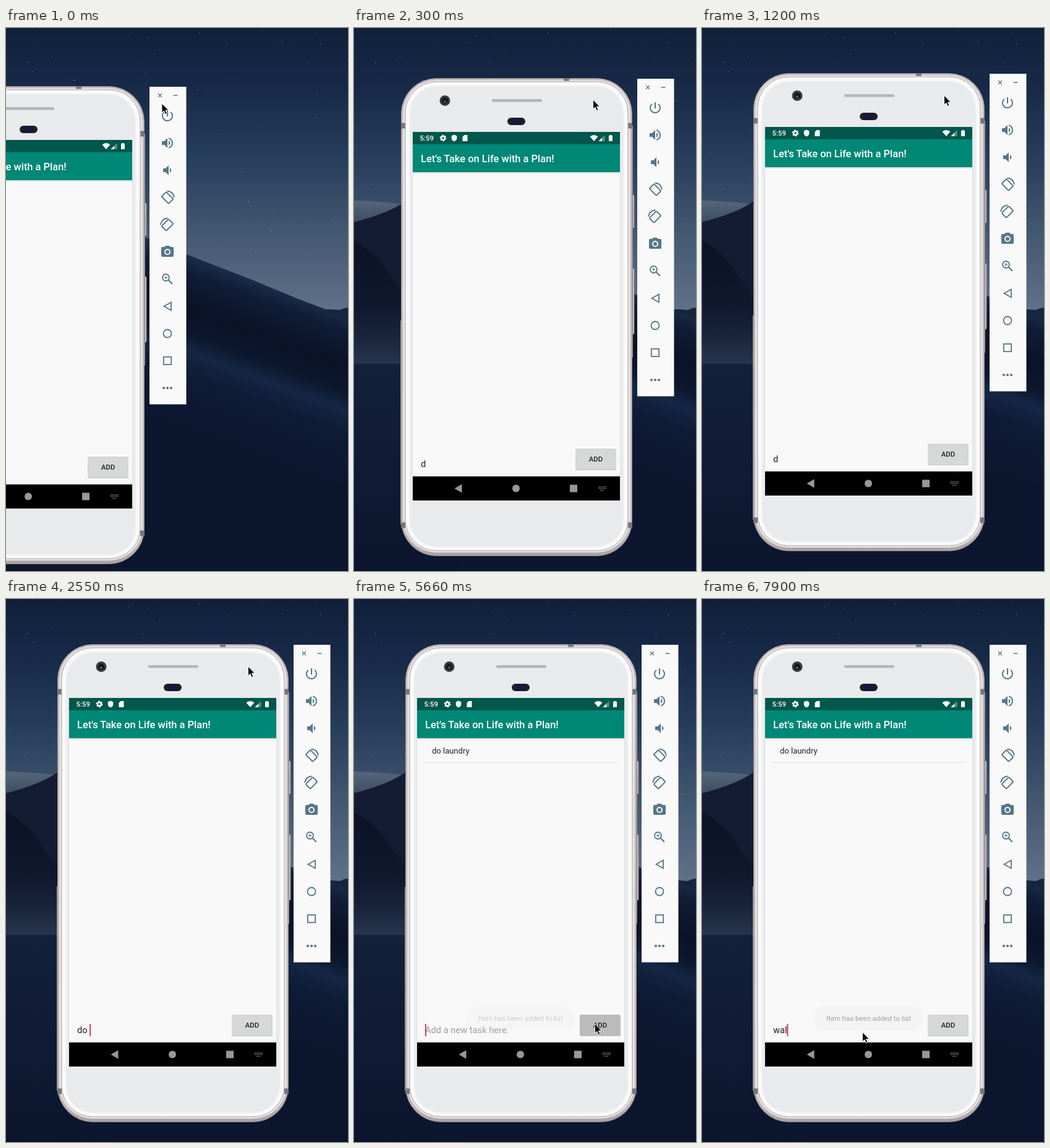
Recreate the animation shown at these times as an HTML page. Size 553 by 878 pixels, loop 8000 ms.

```html
<!DOCTYPE html>
<html>
<head>
<meta charset="utf-8">
<style>
  html, body { margin: 0; height: 100%; overflow: hidden; background: #0b1530; }
  svg { display: block; width: 553px; height: 878px; }
  text { font-family: Roboto, sans-serif; white-space: pre; fill: #222; }
  .medium { font-weight: 500; }
  .line { fill: none; stroke: #557788; stroke-width: 1.8; }
</style>
</head>
<body>
<svg viewBox="0 0 553 878">
  <defs>
    <linearGradient id="sky" gradientUnits="userSpaceOnUse" x1="0" y1="0" x2="0" y2="460">
      <stop offset="0" stop-color="#10203a"/><stop offset=".2" stop-color="#162a47"/>
      <stop offset=".45" stop-color="#263d5b"/><stop offset=".7" stop-color="#41566f"/>
      <stop offset="1" stop-color="#5f738a"/>
    </linearGradient>
    <linearGradient id="ridge" x1="0" y1="0" x2="0" y2="1">
      <stop offset="0" stop-color="#56667b"/><stop offset="1" stop-color="#2a394f"/>
    </linearGradient>
    <linearGradient id="hollow" x1="0" y1="0" x2="0" y2="1">
      <stop offset="0" stop-color="#0b1226"/><stop offset=".55" stop-color="#10192f"/>
      <stop offset=".8" stop-color="#1a263d"/><stop offset="1" stop-color="#27364e"/>
    </linearGradient>
    <linearGradient id="ground" x1="0" y1="0" x2="0" y2="1">
      <stop offset="0" stop-color="#14213b"/><stop offset="1" stop-color="#0b152e"/>
    </linearGradient>
    <linearGradient id="dune" gradientUnits="userSpaceOnUse" x1="400" y1="405" x2="305" y2="660">
      <stop offset="0" stop-color="#1b2f4b"/><stop offset=".1" stop-color="#101d36"/>
      <stop offset=".3" stop-color="#0a1227"/><stop offset=".45" stop-color="#0c182f"/>
      <stop offset=".54" stop-color="#142744"/><stop offset=".68" stop-color="#0e1b35"/>
      <stop offset="1" stop-color="#0c162f"/>
    </linearGradient>
    <linearGradient id="metal" x1="0" y1="0" x2="0" y2="1">
      <stop offset="0" stop-color="#d3cbcc"/><stop offset=".93" stop-color="#d3cbcc"/>
      <stop offset="1" stop-color="#a9a2a3"/>
    </linearGradient>
    <filter id="soft"><feGaussianBlur stdDeviation="1.2"/></filter>
  </defs>

  <rect width="553" height="878" fill="url(#sky)"/>
  <g id="stars" fill="#a9bccd"></g>
  <path d="M170 318Q225 337 292 366L400 408 470 437 520 456 553 466V878H170Z" fill="url(#dune)"/>
  <path d="M514 455l12 0 14 1 7-3 6-1v18z" fill="#17253c"/>
  <path d="M0 279Q45 280 90 286V340H0Z" fill="url(#ridge)"/>
  <path d="M90 275Q70 291 42 301 20 309 0 314V543H90Z" fill="#131c32"/>
  <path d="M0 345Q35 363 52 390 68 418 90 436V543H0Z" fill="url(#hollow)"/>
  <rect y="543" width="170" height="335" fill="url(#ground)"/>
  <rect y="877" width="553" height="1" fill="#050a14"/>

  <g id="emulator">
    <!-- phone body -->
    <g fill="#c5c0c1" stroke="#8d898b" stroke-width=".7">
      <rect x="454" y="262" width="6" height="53" rx="1.5"/>
      <rect x="454" y="381" width="6" height="106" rx="1.5"/>
    </g>
    <path d="M458.700 277V312" stroke="#858184" stroke-dasharray="1 2"/>
    <path d="M82.500 465V795M457.500 150V525" stroke="#9b9596"/>
    <rect x="83.500" y="73.500" width="373" height="772" rx="57" fill="url(#metal)" stroke="#928c8e"/>
    <rect x="85.500" y="75.500" width="369" height="765" rx="55" fill="#e8e1e2" stroke="#b8afb0"/>
    <path d="M83 150h7M450 150h7M83 796h7M450 796h7" stroke="#777679" stroke-width="9"/>
    <path d="M346 75.500h9" stroke="#77777a" stroke-width="4"/>
    <rect x="90" y="79" width="360" height="758" rx="50" fill="#fafafa" stroke="#aaa6a8"/>
    <rect x="97" y="86" width="346" height="745" rx="44" fill="#e8eaeb" filter="url(#soft)"/>
    <circle cx="154" cy="109.500" r="8.500" fill="#3a3a3d"/>
    <circle cx="154" cy="109.500" r="5" fill="#17181d"/>
    <circle cx="154" cy="111" r="1.600" fill="#77787d"/>
    <rect x="230" y="107" width="81" height="4.500" rx="2" fill="#b3b5bf"/>
    <rect x="255" y="137" width="29" height="12" rx="6" fill="#202024"/>
    <rect x="261" y="138" width="17" height="10" rx="3" fill="#15183a"/>

    <!-- screen -->
    <rect x="101.500" y="160" width="336" height="596" fill="#d5d7d8"/>
    <rect x="102" y="160" width="335" height="596" fill="#f8f8f8"/>
    <rect x="102" y="225" width="335" height="2" fill="#d9dedd"/>
    <rect x="102" y="160" width="335" height="20" fill="#00574b"/>
    <rect x="102" y="180" width="335" height="45" fill="#008775"/>
    <g fill="#fff">
      <text class="medium" x="113.500" y="174" font-size="11.400" style="fill:#fff">5:59</text>
      <circle cx="151" cy="170" r="3" fill="none" stroke="#fff" stroke-width="2.600"/>
      <circle cx="151" cy="170" r="4.700" fill="none" stroke="#fff" stroke-width="1.400" stroke-dasharray="2.460"/>
      <path d="M169 164.500l4.300 2v3.500q0 4-4.300 5.500-4.300-1.500-4.300-5.500v-3.500z"/>
      <path d="M185.500 165h5v10h-8v-7z"/>
      <path d="M388.500 167.500q6.500-5 13 0L395 175z"/>
      <path d="M412.500 165v10h-10z" opacity=".35"/><path d="M408 169.500v5.500h-5.500z"/>
      <path d="M420.500 165h3v1h1.500v9h-6v-9h1.500z"/>
    </g>
    <text class="medium" x="115" y="209" font-size="16.450" style="fill:#fff">Let's Take on Life with a Plan!</text>

    <g id="item">
      <text x="126" y="250" font-size="13">do laundry</text>
      <path d="M114 264.500H425" stroke="#dcdcdc"/>
    </g>
    <text id="input" x="115" y="702.300" font-size="14.670"></text>
    <rect id="caret" y="687" width="1.700" height="20" fill="#d81b60"/>
    <rect x="365" y="673" width="66" height="34" rx="2" fill="#c6c6c6"/>
    <rect id="button" x="365" y="672" width="66" height="34" rx="2"/>
    <text class="medium" x="398" y="693" font-size="11.400" text-anchor="middle">ADD</text>
    <g id="toast">
      <rect x="180.500" y="658" width="177.500" height="39" rx="19.500" fill="#eeeeee"/>
      <text x="269.500" y="682" font-size="11.400" text-anchor="middle">Item has been added to list</text>
    </g>

    <rect x="102" y="717" width="335" height="39" fill="#000"/>
    <g fill="#989898">
      <path d="M181.500 729.500v14l-12-7z"/>
      <circle cx="269" cy="736.500" r="6"/>
      <rect x="356" y="730.500" width="12" height="12"/>
    </g>
    <path d="M402 734h13M402 736.500h13M405 739.500h7" stroke="#8a8a8a" stroke-width="1.300" stroke-dasharray="1.300 1"/>

    <!-- tool panel -->
    <rect x="465" y="74" width="59.500" height="513.500" fill="#f9f9f9"/>
    <path class="line" style="stroke-width:1.400" d="M479 85l6 6m0-6l-6 6M503.500 88h7"/>
    <g id="icons" fill="#557788" fill-rule="evenodd"></g>
    <g class="line">
      <path d="M500 422.500v13l-11.500-6.500z"/>
      <circle cx="494" cy="473" r="6.500"/>
      <rect x="487.800" y="510.800" width="12.400" height="12.400"/>
    </g>
    <g fill="#557788">
      <circle cx="488" cy="561" r="2.100"/><circle cx="494" cy="561" r="2.100"/><circle cx="500" cy="561" r="2.100"/>
    </g>
  </g>

  <path id="mouse" d="M0 0V15l3.400-3 2.500 5.500 2.500-1.100-2.400-5.400h4.800z" fill="#000" stroke="#fff" stroke-width=".9"/>
</svg>

<script>
const $ = id => document.getElementById(id);

// Seeded stars, denser towards the top
let seed = 7;
const random = () => (seed = seed * 16807 % 2147483647) / 2147483647;
for (let i = 0; i < 75; i++) {
  const x = random() * 553, y = random() ** 1.4 * 430, size = 0.6 + random() * 0.7;
  if (y < 270 || x > 300)
    $('stars').innerHTML += `<rect x="${x}" y="${y}" width="${size}" height="${size}" opacity="${0.3 + random() * 0.5}"/>`;
}

const rotate = '<g class="line"><rect x="6.700" y="4.500" width="10.600" height="16" rx="1.500" stroke-width="2" transform="rotate(-45 12 12.500)"/><path d="M11.500 1.500Q21 2 23 12"/></g>';
const path = d => `<path d="${d}"/>`;
const icons = [
  path('M13 3h-2v10h2V3zm4.830 2.170l-1.420 1.420C17.990 7.860 19 9.810 19 12c0 3.870-3.130 7-7 7s-7-3.130-7-7c0-2.190 1.010-4.140 2.580-5.420L6.170 5.170C4.230 6.820 3 9.260 3 12c0 4.970 4.030 9 9 9s9-4.030 9-9c0-2.740-1.230-5.180-3.170-6.830z'),
  path('M3 9v6h4l5 5V4L7 9zM14 8q5 4 0 8zM14 3.200v2.100q5 1.700 5 6.700t-5 6.700v2.100q7-2 7-8.800t-7-8.800z'),
  path('M5 9v6h4l5 5V4L9 9zM16 8q5 4 0 8z'),
  rotate,
  `<g transform="matrix(-1 0 0 1 24 0)">${rotate}</g>`,
  path('M9 2L7.200 4H4q-2 0-2 2v12q0 2 2 2h16q2 0 2-2V6q0-2-2-2h-3.200L15 2zM7 12a5 5 0 0 1 10 0a5 5 0 0 1-10 0z') + '<circle cx="12" cy="12" r="3.100"/>',
  '<g class="line"><circle cx="9.500" cy="9.500" r="5.500"/><path d="M13.800 13.800l6 6" stroke-width="2.300"/><path d="M9.500 7v5M7 9.500h5" style="stroke-width:1.100"/></g>'
];
$('icons').innerHTML = icons.map((icon, i) => `<g transform="translate(482 ${109 + 44 * i})">${icon}</g>`).join('');

// Each track lists [start time, value...]; a value holds until the next entry
const hint = 'Add a new task here.';
const tracks = {
  window: [[0, -233, 21], [150, -90, 13], [300, -7, 8], [450, -7, 5], [600, -7, 3], [750, -6, 2], [900, 0, 0]],
  mouse: [[0, 252, 122], [150, 330, 118], [300, 386.5, 116], [450, 387, 113], [600, 387.5, 111], [750, 388.5, 110],
    [900, 391.5, 109], [4480, -50, -50], [4780, 351, 674], [5070, 467, 695], [5220, 400, 689], [5360, 389.5, 687],
    [5810, 370, 690], [5960, 300, 698], [6110, 259.5, 700.5]],
  input: [[0, 'd'], [2400, 'do'], [2550, 'do '], [2850, 'do l'], [3000, 'do la'], [3150, 'do lau'], [3300, 'do laun'],
    [3450, 'do laund'], [3740, 'do laundry'], [3890, 'do laundry '], [4180, 'do laundry'], [5510, ''],
    [7600, 'w'], [7750, 'wa'], [7900, 'wal']],
  caret: [[0, 0], [750, 1], [1200, 0], [1650, 1], [2100, 0], [2400, 1], [4780, 0], [5220, 1], [6550, 0], [7150, 1]],
  button: [[0, '#d6d7d7'], [5360, '#c6c7c7'], [5510, '#babbbb'], [5810, '#c9caca'], [5960, '#d6d7d7']],
  toast: [[0, 0], [5660, 0.2], [5810, 0.6], [5960, 0.9], [6110, 1], [7600, 0.9], [7750, 0.65], [7900, 0.4]]
};
const at = (name, t) => tracks[name].findLast(step => step[0] <= t).slice(1);
const place = (id, [x, y]) => $(id).setAttribute('transform', `translate(${x} ${y})`);

function draw(now) {
  const t = now % 8000, [typed] = at('input', t), input = $('input');
  place('emulator', at('window', t));
  place('mouse', at('mouse', t));
  input.textContent = typed;
  $('caret').setAttribute('x', 115 + (typed ? input.getComputedTextLength() : 0));
  $('caret').style.opacity = at('caret', t)[0];
  input.textContent = typed || hint;
  input.style.fill = typed ? '#222' : '#9c9c9c';
  $('button').style.fill = at('button', t)[0];
  $('item').style.opacity = t >= 5510 ? 1 : 0;
  $('toast').style.opacity = at('toast', t)[0];
  requestAnimationFrame(draw);
}
draw(0);
</script>
</body>
</html>
```
